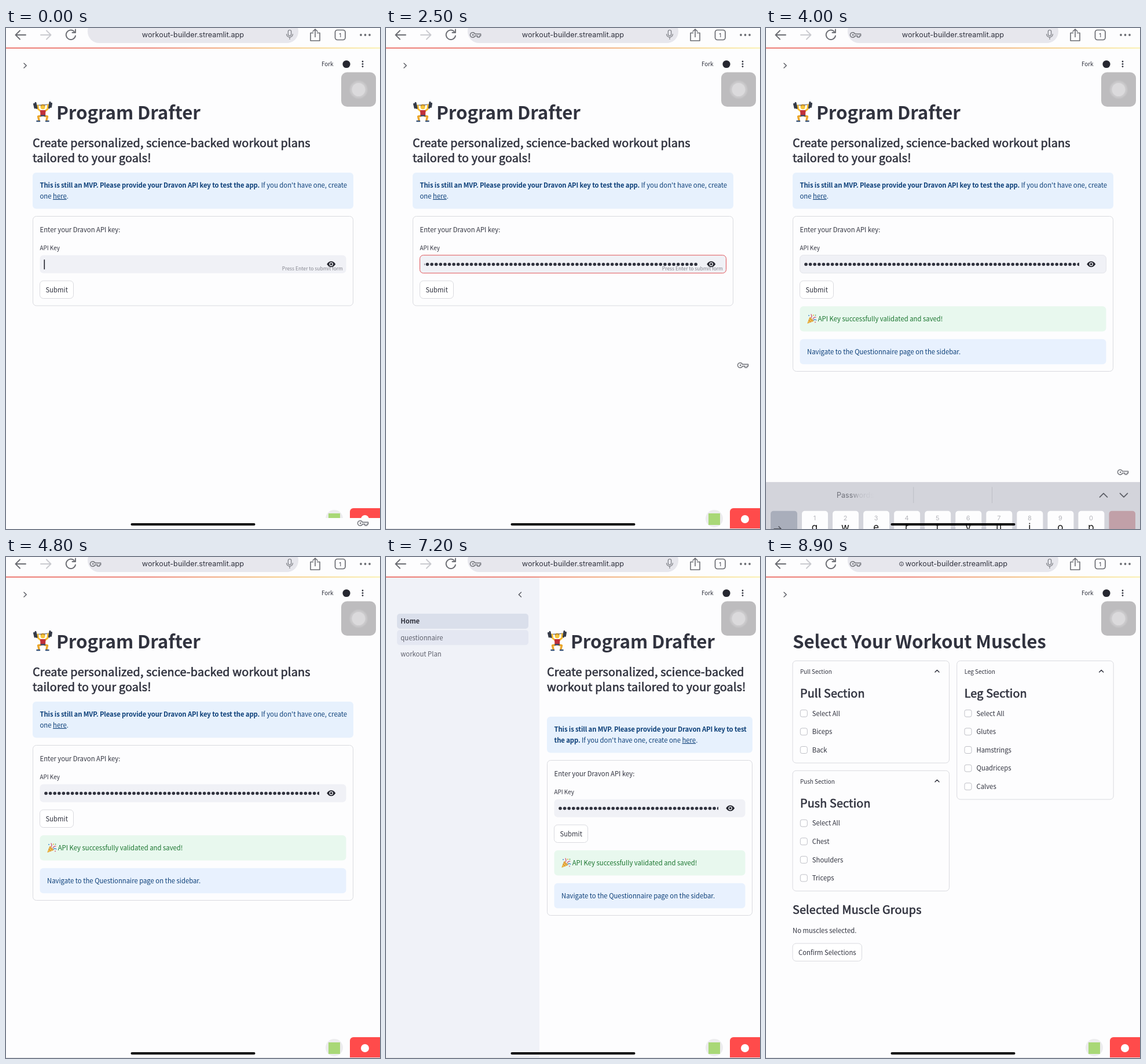
Write an HTML page that moves like this. It is 646 px wide and 866 px high and loops after 9100 ms.

```html
<!DOCTYPE html>
<html lang="en">
<head>
<meta charset="utf-8">
<title>Program Drafter</title>
<style>
html, body { margin: 0; width: 100%; height: 100%; overflow: hidden; background: #fdfdfe; }
svg { display: block; width: 646px; height: 866px; }
text { font-family: "Noto Sans CJK JP", "Noto Sans CJK SC", "Noto Sans CJK", sans-serif; fill: #31333f; white-space: pre; }
.ui { font-family: Inter, "Liberation Sans", sans-serif; }
.h1 { font-weight: 700; letter-spacing: -.005em; }
.h3 { stroke: #31333f; stroke-width: .65px; letter-spacing: .16px; }
.b { font-weight: 700; letter-spacing: -.01em; }
.info, .info tspan { fill: #0c3f78; }
</style>
</head>
<body>
<svg id="stage" viewBox="0 0 646 866"></svg>
<script>
const LOOP = 9100, STEP = 100, SIDE = 265;
const stage = document.getElementById('stage');
const INK = '#31333f', LINE = '#d9dadf';

const easeOut = (t, start, length) => {
  const q = Math.min(1, Math.max(0, (t - start) / length));
  return 1 - (1 - q) ** 2;
};
const text = (x, y, s, size = 11.3, attrs = '') =>
  `<text x="${x}" y="${y}" font-size="${size}" ${attrs}>${s}</text>`;
const box = (x, y, w, h, fill, r = 6, stroke = 'none') =>
  `<rect x="${x}" y="${y}" width="${w}" height="${h}" rx="${r}" fill="${fill}" stroke="${stroke}"/>`;
const dot = (x, y, r, fill = INK) => `<circle cx="${x}" cy="${y}" r="${r}" fill="${fill}"/>`;
const path = (d, stroke, width = 1.5, fill = 'none') =>
  `<path d="${d}" fill="${fill}" stroke="${stroke}" stroke-width="${width}" stroke-linecap="round" stroke-linejoin="round"/>`;
const at = (x, y, s) => `<g transform="translate(${x} ${y})">${s}</g>`;
const repeat = (n, fn) => Array.from({ length: n }, (_, i) => fn(i)).join('');

const keyIcon = (x, y) => at(x, y,
  path('M-1.3-1.6A4.3 4.3 0 1 0-1.3 1.6H3V4H6.5V1.6H8.6V-1.6Z', '#7b7d83', 1.6) + dot(-4.8, 0, 1.4, '#7b7d83'));

const eyeIcon = (x, y) => at(x, y,
  path('M-7.5 0Q-4.5-5 0-5T7.5 0Q4.5 5 0 5T-7.5 0Z', 'none', 0, '#262730') +
  dot(0, 0, 3.2, '#f0f1f6') + dot(0, 0, 1.9, '#262730'));

const lifter = x => at(x, 127,
  path('M3 7L30 5', '#777d88', 1.4) +
  path('M13 17L8.5 13 8 7M20 17L25 13 25.5 6', '#f5b92e', 3) +
  path('M13 25L8.5 26 10 32M20 25L24.5 26 23 32', '#e9a52a', 3.4) +
  path('M6.5 34H11M22 34H26.5', '#3b5578', 2.6) +
  path('M4 2.5L6 11.5M1.5 4.5L3 11M29 1.5L27.5 11M31.5 3.5L30.5 9.5', '#343a48', 3) +
  path('M13 16H20.5L20 24H13.5Z', '#c0303a', 2, '#c0303a') +
  path('M13.5 24.5H20', '#39476b', 2.4) +
  dot(16.6, 9.5, 4, '#f8c63c') + path('M13.5 7.5Q16.6 4 19.7 7.5', '#b9852a', 1.8));

const popper = (x, y) => at(x, y,
  path('M1 16L5 6 11 12Z', '#e5a52f', 1, '#f3c04a') +
  path('M3 11L6 14M4.5 8L9 12.5', '#b9703a', 1) +
  path('M7 7Q9 4 7 1M10 9Q12 5 15 6', '#d2577a', 1.3) +
  path('M11 11Q13 9 16 11', '#4a8fd0', 1.3) +
  dot(3, 3, 1, '#4a8fd0') + dot(11, 2.5, 1.1, '#e8b43a') + dot(14.5, 2.5, .9, '#57a86a') + dot(14, 14.5, .9, '#d2577a'));

function toolbar(t) {
  const gray = '#6a6c72', secure = t >= 7700;
  return box(0, 0, 646, 34, '#fdfdfe', 0) +
    box(141, -14, 364, 40, '#e7e7ed', 20) +
    path('M34 12H17M24 4.5L16.5 12L24 19.5', gray, 1.9) +
    path('M60 12H77M70 4.5L77.5 12L70 19.5', '#c9cacf', 1.9) +
    path('M117.8 6A8.2 8.2 0 1 0 120 13.5M120 2.5V8H114.5', gray, 1.9) +
    (t >= 500 ? keyIcon(155, 12) : '') +
    text(secure ? 329 : 323, 16, 'workout-builder.streamlit.app', 12.7, 'class="ui" text-anchor="middle"') +
    (secure ? `<circle cx="234" cy="12" r="3.4" fill="none" stroke="${INK}" stroke-width=".9"/>` +
      path('M234 11.8V13.7M234 10.2V10.3', INK, .9) : '') +
    `<rect x="487.3" y="3.5" width="5.4" height="10" rx="2.7" fill="none" stroke="#7b7d83" stroke-width="1.2"/>` +
    path('M484.6 10.5A5.4 5.4 0 0 0 495.4 10.5M490 16V19.5', '#7b7d83', 1.2) +
    path('M530.5 8.5H526V22H542V8.5H537.5M534 15.5V2.5M530 6L534 2L538 6', gray, 1.6) +
    `<rect x="568.5" y="3.5" width="17.5" height="17" rx="4" fill="none" stroke="${gray}" stroke-width="1.7"/>` +
    text(577.2, 15.5, '1', 9.5, 'class="ui" text-anchor="middle"') +
    repeat(3, i => dot(613 + 7.5 * i, 12, 1.9, gray)) +
    '<rect y="33.8" width="646" height="1.6" fill="url(#rule)"/>';
}

function overlays() {
  return text(545, 66, 'Fork', 9.9) + dot(588, 62.5, 6.6, '#262730') +
    repeat(3, i => dot(616, 58 + 4.3 * i, 1.4)) +
    box(579, 76.5, 60, 59.5, '#bdbcbe', 10) +
    dot(609, 106.5, 16, '#c4c3c5') + dot(609, 106.5, 14, '#cbcacc') + dot(609, 106.5, 11.5, '#dbdadc');
}

function badges() {
  return dot(567, 848, 15, '#ececee') + box(557, 839, 20, 20, '#a9d877', 0) +
    box(594, 830, 60, 50, '#ff4b4b') + dot(620, 849, 7, '#fff') +
    box(0, 865, 646, 1, '#e3e3e6', 0);
}

function field(t, x, y, w) {
  const pasted = t >= 1500, focused = t < 3800, left = x + 20, right = x + w - 59;
  const border = focused ? (t >= 200 ? '#e0555a' : 'none') : t < 4500 ? '#e3e4ea' : 'none';
  const first = focused ? x + 17.9 : x + 23;
  return box(x + 12.5, y, w - 25, 31, '#f0f1f6', 6, border) +
    (pasted ? `<clipPath id="mask"><rect x="${left}" y="${y}" width="${right - left}" height="31"/></clipPath>` +
      `<g clip-path="url(#mask)">${repeat(63, i => dot(first + 7.6 * i, y + 15.8, 2.8))}</g>` : '') +
    (!pasted && t % 1000 < 500 ? box(x + 19.5, y + 7.5, 1.6, 17, '#20212a', .5) : '') +
    eyeIcon(x + w - 38.3, y + 15.5) +
    (focused ? text(x + w - 18, y + 26.5, 'Press Enter to submit form', 8.5, 'text-anchor="end" style="fill:#85868f"') : '');
}

function home(t, x, w) {
  const narrow = w < 450, done = t >= 3500, dy = narrow ? 26 : 0;
  const slogan = narrow
    ? ['Create personalized, science-backed', 'workout plans tailored to your goals!']
    : ['Create personalized, science-backed workout plans', 'tailored to your goals!'];
  const bold = s => `<tspan class="b">${s}</tspan>`;
  const link = '<tspan text-decoration="underline">here</tspan>.';
  const lead = 'This is still an MVP. Please provide your Dravon API key to test';
  const note = narrow
    ? [bold(lead), bold('the app.') + " If you don't have one, create one " + link]
    : w < 553
      ? [bold(lead + ' the app.') + " If you don't have one,", 'create one ' + link]
      : [bold(lead + ' the app.') + " If you don't have one, create", 'one ' + link];
  return lifter(x + 1) + text(x + 41, 158, 'Program Drafter', 31.4, 'class="h1"') +
    slogan.map((s, i) => text(x, 206 + 26 * i, s, 19.8, 'class="h3"')).join('') +
    at(0, dy,
      box(x, 250, w, 62.5, '#e7f1fd') +
      note.map((s, i) => text(x + 12.5, 275.8 + 19 * i, s, 11.3, 'class="info"')).join('') +
      box(x + .5, 325.5, w - 1, done ? 268 : 154.5, 'none', 6, LINE) +
      text(x + 12.5, 352.5, 'Enter your Dravon API key:') +
      text(x + 12.5, 384, 'API Key', 9.9) +
      field(t, x, 392.7, w) +
      box(x + 12.5, 437, 58, 30.5, '#fff', 6, LINE) + text(x + 22.5, 456.8, 'Submit') +
      (done
        ? box(x + 12.5, 481, w - 25, 43.5, '#e8f8ee') + popper(x + 25, 494) +
          text(x + 43.7, 507, 'API Key successfully validated and saved!', 11.3, 'style="fill:#1a752f"') +
          box(x + 12.5, 537.7, w - 25, 43.5, '#e8f1fe') +
          text(x + 25, 563.7, 'Navigate to the Questionnaire page on the sidebar.', 11.3, 'class="info"')
        : ''));
}

function section(x, y, name, items) {
  const rows = ['Select All', ...items];
  return box(x, y, 270.5, 82 + 31.5 * rows.length, 'none', 6, LINE) +
    text(x + 13, y + 22.3, name, 9.9) +
    path(`M${x + 246} ${y + 19.5}l3.5-3.5 3.5 3.5`, INK, 1.5) +
    text(x + 13, y + 63.3, name, 19.8, 'class="h3"') +
    rows.map((s, i) => box(x + 13.3, y + 84.8 + 31.6 * i, 12, 12, '#fff', 3, '#bfc0c7') +
      text(x + 33.8, y + 95 + 31.6 * i, s)).join('');
}

function muscles() {
  return text(46, 158, 'Select Your Workout Muscles', 31.4, 'class="h1"') +
    section(46, 179.5, 'Pull Section', ['Biceps', 'Back']) +
    section(46, 369.3, 'Push Section', ['Chest', 'Shoulders', 'Triceps']) +
    section(329.7, 179.5, 'Leg Section', ['Glutes', 'Hamstrings', 'Quadriceps', 'Calves']) +
    text(46, 617, 'Selected Muscle Groups', 19.8, 'class="h3"') +
    text(46, 649.5, 'No muscles selected.') +
    box(46, 668, 119.5, 30.5, '#fff', 6, LINE) + text(56, 687.8, 'Confirm Selections');
}

function sidebar(t, x) {
  return at(x, 0, box(0, 35.5, SIDE, 829.5, '#f0f2f8', 0) +
    box(19, 98, 227, 26, '#dadfeb', 5) +
    (t >= 6900 ? box(19, 126.3, 227, 26, '#e4e7f2', 5) : '') +
    text(25.3, 115.2, 'Home', 11.3, 'class="b"') +
    ['questionnaire', 'workout Plan'].map((s, i) =>
      text(25.3, 143.5 + 28.4 * i, s, 11.3, 'style="fill:#5d5f6b"')).join('') +
    (t >= 5500 ? path('M233.5 61L229.3 65L233.5 69', '#55575f', 1.4) : ''));
}

function keyboard(top) {
  return at(0, top, box(0, 0, 646, 300, '#d3d4db', 0) +
    text(122, 27, 'Passwords', 12.6, 'class="ui" style="fill:url(#fade)"') +
    path('M254.8 9V36M390.5 9V36', '#bdbec6', 1) +
    path('M576.5 26L583 19.5L589.5 26M611.5 19.5L618 26L624.5 19.5', '#5c5e66', 1.7) +
    box(8, 50, 46, 60, '#a9aebb', 5) + box(592.5, 50, 45.5, 60, '#c1a0a8', 5) +
    path('M14 81H26M22 77L26 81L22 85', '#4b4d55', 1.4) +
    [...'qwertyuiop'].map((c, i) => {
      const x = 62 + 53.05 * i;
      return box(x, 50, 45, 60, '#fdfdfe', 5) +
        text(x + 22, 66, (i + 1) % 10, 11, 'class="ui" text-anchor="middle" style="fill:#b4b5bb"') +
        text(x + 22, 84, c, 17, 'class="ui" text-anchor="middle" style="fill:#111"');
    }).join(''));
}

const defs = `<defs>
  <linearGradient id="rule"><stop stop-color="#e8574e"/><stop offset=".38" stop-color="#e9695a"/>
    <stop offset=".72" stop-color="#f3bd6a"/><stop offset="1" stop-color="#faeea0"/></linearGradient>
  <linearGradient id="fade"><stop offset=".4" stop-color="#6d6f78"/><stop offset=".6" stop-color="#b9bac2"/>
    <stop offset="1" stop-color="#d3d4db"/></linearGradient></defs>`;

function scene(t) {
  const opening = easeOut(t, 5100, 300), closing = easeOut(t, 7700, 410);
  const open = t >= 5100 && closing < 1;
  const mainLeft = open ? SIDE * (1 - closing) : 0;
  const w = Math.min(554, 620 - mainLeft), x = mainLeft + (646 - mainLeft - w) / 2;
  const sideLeft = closing ? -SIDE * 2 * closing : -SIDE * (1 - opening);

  const rise = easeOut(t, 0, 400), fall = easeOut(t, 3850, 365);
  const keysTop = t < 3850 ? 873 - 273 * rise : 600 + 283 * fall;
  const falling = t >= 3850 && fall < 1;

  return defs + box(0, 0, 646, 866, '#fdfdfe', 0) +
    (!open || closing ? path('M31 61L35.2 65L31 69', '#55575f', 1.4) : '') +
    (t < 8200 ? home(t, x, w) : muscles()) +
    badges() +
    (open ? sidebar(t, sideLeft) : '') +
    overlays() +
    (rise < 1 ? box(0, 847, 646, 19, '#fdfdfe', 0) : '') +
    (falling ? keyboard(keysTop) : '') +
    (fall < 1 ? keyIcon(617, keysTop - 17) : '') +
    toolbar(t) +
    box(215.5, 856, 215, 4, '#000', 2);
}

let shown = -1;
const began = performance.now();
function tick() {
  const elapsed = Math.max(0, performance.now() - began) % LOOP;
  const t = Math.floor(elapsed / STEP) * STEP;
  if (t !== shown) {
    shown = t;
    stage.innerHTML = scene(t);
  }
  requestAnimationFrame(tick);
}
tick();
</script>
</body>
</html>
```
